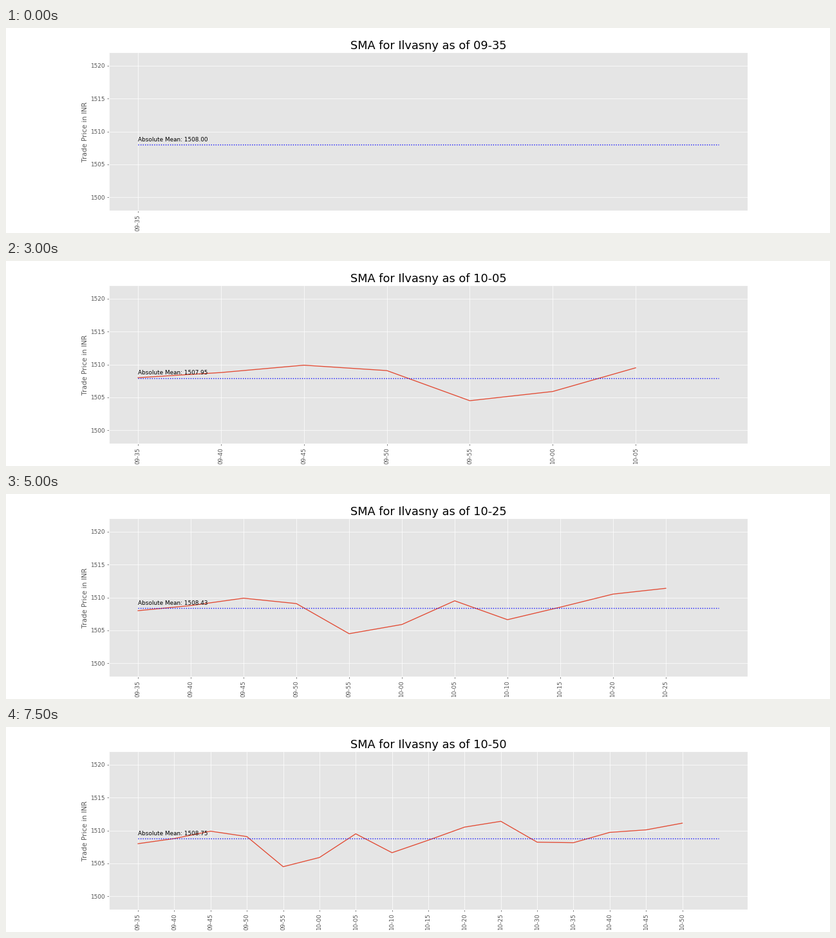
Recreate the animation shown at these times as a matplotlib script. Size 1280x320 px, loop 8000 ms.

```python
import matplotlib.pyplot as plt
import numpy as np
from matplotlib.animation import FuncAnimation

plt.style.use("ggplot")
plt.rcParams["font.family"] = "DejaVu Sans"

COMPANY = "Ilvasny"
PRICES = 1500 + np.array([
    8.0, 8.78, 9.9, 9.08, 4.5, 5.9, 9.5, 6.63,
    8.53, 10.52, 11.4, 8.23, 8.15, 9.72, 10.1, 11.12,
])
START = 9 * 60 + 35  # minutes since midnight
STEP = 5


def clock(i):
    hours, minutes = divmod(START + STEP * i, 60)
    return f"{hours:02d}-{minutes:02d}"


fig, ax = plt.subplots(figsize=(20, 5), dpi=64)


def draw(frame):
    n = frame + 1
    x = np.arange(n)
    mean = PRICES[:n].mean()

    ax.clear()
    ax.plot(x, PRICES[:n], color="#E24A33", lw=1.5)
    ax.hlines(mean, 0, n, colors="blue", linestyles="dotted", lw=1.5)
    ax.text(0, mean + 0.5, f"Absolute Mean: {mean:.2f}", fontsize=10)

    margin = 0.05 * n
    ax.set_xlim(-margin, n + margin)
    ax.set_ylim(1498, 1522)
    ax.set_xticks(x, [clock(i) for i in x], rotation=90)
    ax.set_yticks(range(1500, 1521, 5))
    ax.set_ylabel("Trade Price in INR")
    ax.set_title(f"SMA for {COMPANY} as of {clock(frame)}", fontsize=20)


anim = FuncAnimation(fig, draw, frames=len(PRICES), interval=500,
                     repeat=True, repeat_delay=0)
plt.show()
```
